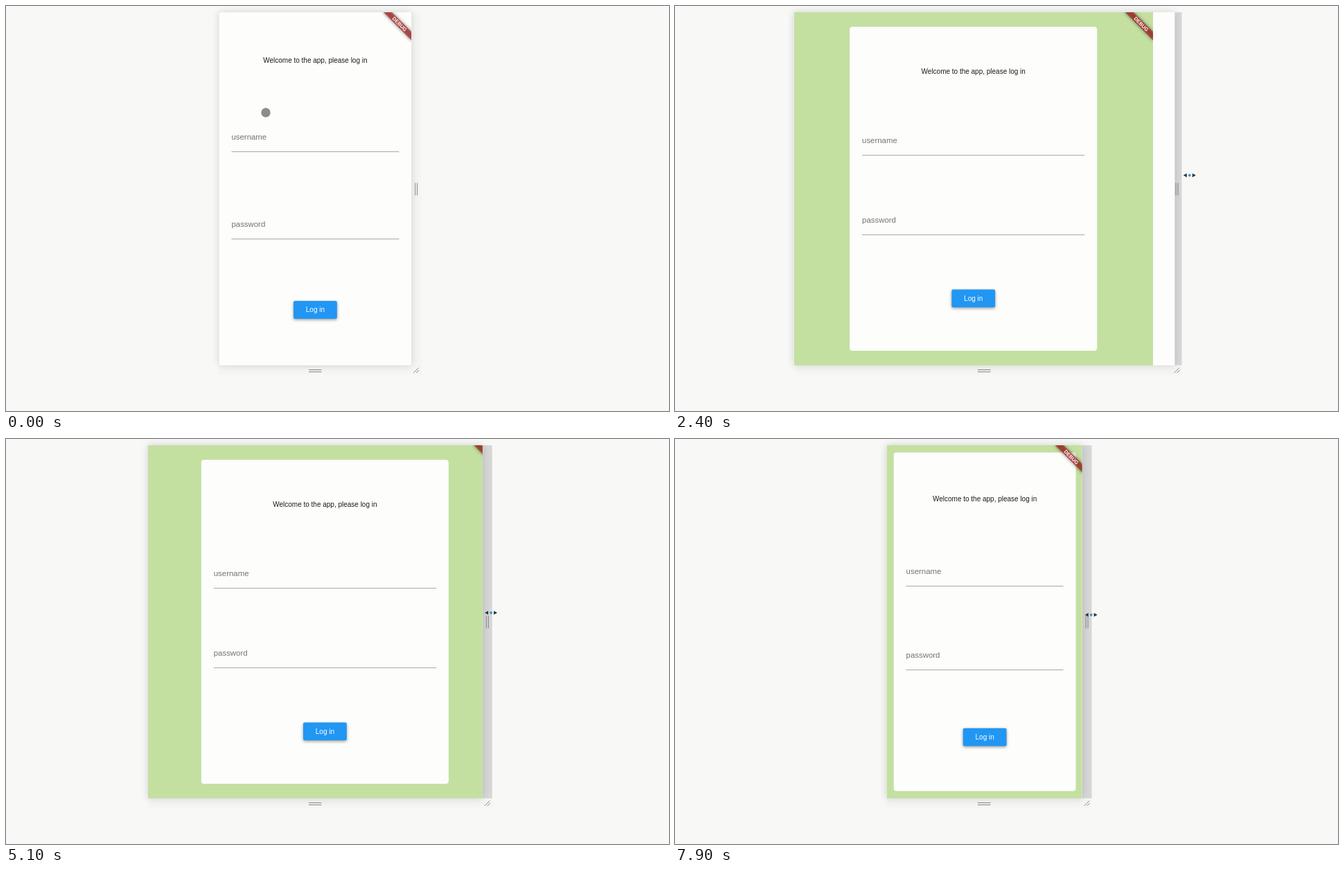
Recreate the animation shown at these times as an HTML page with a canvas. Size 957x585 px, loop 8 s.

```html
<!DOCTYPE html>
<html lang="en">
<head>
<meta charset="utf-8">
<title>Responsive login</title>
<style>
  html, body { margin: 0; width: 100%; height: 100%; overflow: hidden; background: #f8f8f7; }
  canvas { display: block; }
</style>
</head>
<body>
<canvas id="stage" width="957" height="585"></canvas>
<script>
const ctx = document.getElementById('stage').getContext('2d');
const FONT = '"Liberation Sans", Arial, sans-serif';
const LOOP = 8000, STEP = 100;
const MID = 446.4, TOP = 9, BOTTOM = 519, BAR = 14;
const UNIT = 0.714; // logical pixel
const GRAB = 750;   // pointer reaches the handle
const PAD = 21, PAD_TIME = 360, WIDE_AT = 1815, NARROW_AT = 7720;

// Turning points of the drag: [ms, left edge of the window]
const DRAG = [[800, 307.6], [1800, 265.5], [2900, 93], [3400, 57], [3800, 57], [4100, 107],
  [4200, 113.5], [5000, 191], [5100, 205], [6900, 249.5], [7000, 258], [7800, 304.5], [8000, 306]];

const clamp = v => Math.min(1, Math.max(0, v));
const mix = (a, b, k) => a + (b - a) * k;

function leftAt(t) {
  const i = DRAG.findIndex(key => t <= key[0]);
  if (i < 1) return DRAG[i ? DRAG.length - 1 : 0][1];
  const [t0, a] = DRAG[i - 1], [t1, b] = DRAG[i];
  return mix(a, b, (t - t0) / (t1 - t0));
}

const rightAt = t => 2 * MID - leftAt(t);

function padAt(t) {
  const ramp = from => clamp((t - from) / PAD_TIME);
  return PAD * (ramp(WIDE_AT) - ramp(NARROW_AT));
}

// The pointer runs a little ahead of the window and past its widest size
function dragPoint(t) {
  const past = 55 * Math.sin(Math.PI * clamp((t - 3000) / 1100));
  return {
    x: rightAt(t + 50) + 13.5 + past,
    y: 254 - 17 * Math.exp(-(((t - 3400) / 1300) ** 2))
  };
}

function pointerAt(t) {
  const p = dragPoint(Math.max(t, GRAB));
  const k = clamp(t / GRAB);
  return { x: mix(375, p.x, k), y: mix(154, p.y, k) };
}

function rect(x, y, w, h, color) {
  ctx.fillStyle = color;
  ctx.fillRect(x, y, w, h);
}

function roundRect(x, y, w, h, r, color) {
  ctx.fillStyle = color;
  ctx.beginPath();
  ctx.roundRect(x, y, w, h, r);
  ctx.fill();
}

function line(x0, y0, x1, y1, color) {
  ctx.strokeStyle = color;
  ctx.lineWidth = 1;
  ctx.beginPath();
  ctx.moveTo(x0, y0);
  ctx.lineTo(x1, y1);
  ctx.stroke();
}

function text(str, x, y, size, color, align = 'left', weight = '') {
  ctx.font = `${weight} ${size}px ${FONT}`;
  ctx.textAlign = align;
  ctx.fillStyle = color;
  ctx.fillText(str, x, y);
}

function shadow(color, blur, dx = 0, dy = 0) {
  ctx.shadowColor = color;
  ctx.shadowBlur = blur;
  ctx.shadowOffsetX = dx;
  ctx.shadowOffsetY = dy;
}

const noShadow = () => shadow('transparent', 0);

function handles(left, active) {
  const right = 2 * MID - left;
  rect(left, BOTTOM, right + BAR - left, BAR, '#f5f5f4');
  rect(right, TOP, BAR, BOTTOM - TOP, active ? '#d7d7d7' : '#f5f5f4');
}

function grips(right) {
  const c = '#858585';
  for (const d of [5.5, 8.5]) {
    line(right + d, 255.5, right + d, 273.5, c);
    line(437, BOTTOM + d + 1, 455.5, BOTTOM + d + 1, c);
  }
  line(right + 3, 530, right + 10.5, 522.5, c);
  line(right + 7, 530, right + 11, 526, c);
}

function field(label, x0, x1, y) {
  text(label, x0, y, 16 * UNIT, '#737373');
  const lineY = Math.floor(y + 17.4) + 0.5;
  line(x0, lineY, x1, lineY, '#a9a9a6');
}

function card(x, width, pad) {
  const w = Math.min(500 * UNIT, width - 2 * pad);
  const mid = x + width / 2, x0 = mid - w / 2;
  const f0 = x0 + 25 * UNIT, f1 = x0 + w - 25 * UNIT;
  roundRect(x0, TOP + pad, w, BOTTOM - TOP - 2 * pad, 4, '#fdfdfc');
  text('Welcome to the app, please log in', mid, 82 + 0.76 * pad, 14 * UNIT, '#1c1c1c', 'center');
  field('username', f0, f1, 192.6 + 0.24 * pad);
  field('password', f0, f1, 318.8 - 0.26 * pad);

  const by = 426 - 0.786 * pad;
  shadow('rgba(0,0,0,.4)', 4, 0, 1.5);
  roundRect(mid - 31.4, by, 62.8, 25.8, 2, '#2196f3');
  noShadow();
  text('Log in', mid, by + 16.4, 14 * UNIT, '#fff', 'center');
}

function ribbon(right) {
  const y = 28 * UNIT, h = 12 * UNIT, w = 80 * UNIT;
  const place = x => {
    ctx.translate(x, TOP);
    ctx.rotate(Math.PI / 4);
  };
  // Cast from off stage, so that only the soft shadow shows
  ctx.save();
  place(right - 3000);
  shadow('rgba(0,0,0,.5)', 5, 3000);
  rect(-w / 2, y, w, h, '#000');
  ctx.restore();

  ctx.save();
  place(right);
  rect(-w / 2, y, w, h, 'rgba(183,28,28,.63)');
  text('DEBUG', 0, y + h / 2 + 2.4, 10.2 * UNIT, '#fff', 'center', 'bold');
  ctx.restore();
}

function pointer({ x, y }, dragging) {
  const dot = (r, color) => {
    ctx.fillStyle = color;
    ctx.beginPath();
    ctx.arc(x, y, r, 0, 2 * Math.PI);
    ctx.fill();
  };
  if (!dragging) return dot(6.7, '#8c8c8b');
  dot(2, '#35a0e0');
  ctx.fillStyle = '#333';
  for (const s of [-1, 1]) {
    ctx.beginPath();
    ctx.moveTo(x + s * 9, y);
    ctx.lineTo(x + s * 4, y - 2.8);
    ctx.lineTo(x + s * 4, y + 2.8);
    ctx.fill();
  }
}

function draw(t) {
  const left = leftAt(t), width = rightAt(t) - left, height = BOTTOM - TOP;
  // The handles trail a growing window, the app lays itself out one step late
  const handleLeft = Math.max(left, leftAt(t - 25));
  const appWidth = 2 * (MID - leftAt(t - STEP));
  const pad = padAt(t), radius = pad > 0 ? 0 : 4;
  const dragging = t >= GRAB;

  rect(0, 0, 957, 585, '#f8f8f7');
  handles(handleLeft, dragging);
  shadow('rgba(0,0,0,.16)', 11);
  roundRect(left, TOP, width, height, radius, '#fdfdfc');
  noShadow();

  ctx.save();
  ctx.beginPath();
  ctx.roundRect(left, TOP, width, height, radius);
  ctx.clip();
  ctx.beginPath();
  ctx.rect(left, TOP, appWidth, height);
  ctx.clip();
  if (pad > 0) rect(left, TOP, appWidth, height, '#c3e0a1');
  card(left, appWidth, pad);
  ribbon(left + appWidth);
  ctx.restore();

  grips(2 * MID - handleLeft);
  pointer(pointerAt(t), dragging);
}

const start = performance.now();
function tick(now) {
  const t = Math.max(0, now - start) % LOOP;
  draw(Math.floor(t / STEP) * STEP);
  requestAnimationFrame(tick);
}
draw(0);
requestAnimationFrame(tick);
</script>
</body>
</html>
```
